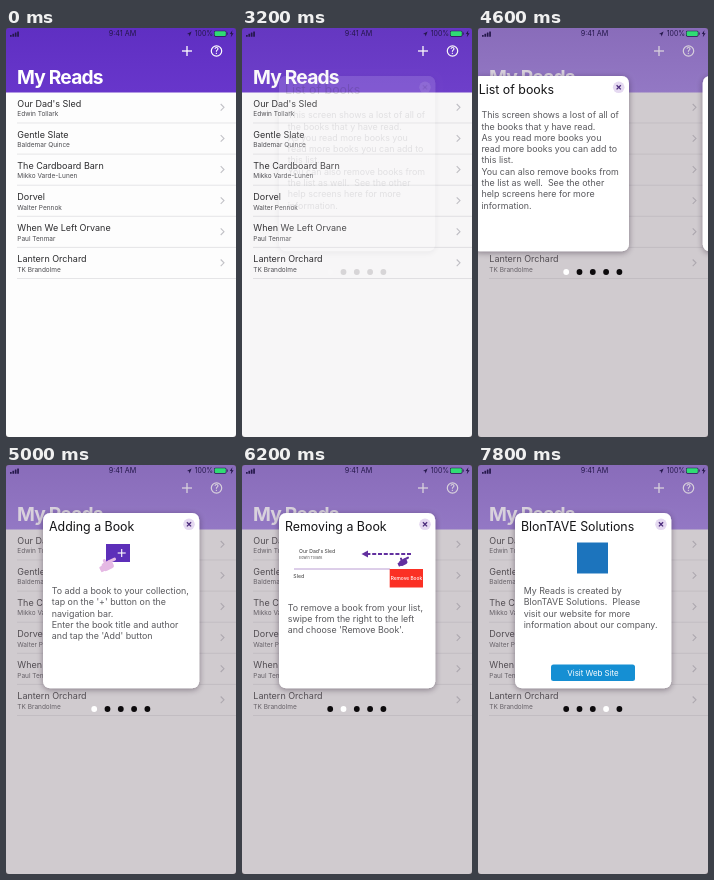
An HTML page with a canvas that plays this animation: 230x409 px, repeating every 8000 ms.

```html
<!DOCTYPE html>
<html lang="en">
<head>
<meta charset="utf-8">
<title>Book list help</title>
<style>
html, body { margin: 0; width: 100%; height: 100%; overflow: hidden; background: #fff; }
canvas { display: block; width: 230px; height: 409px; }
</style>
</head>
<body>
<canvas id="stage"></canvas>
<script>
const W = 230, H = 409, LOOP = 8000;
const FADE_START = 3085, FADE_LENGTH = 500;
const SWIPE_STARTS = [4500, 5700, 7100], SWIPE_LENGTH = 500, DOT_DELAY = 650;

const canvas = document.getElementById('stage');
const scale = window.devicePixelRatio || 1;
canvas.width = Math.round(W * scale);
canvas.height = Math.round(H * scale);
const ctx = canvas.getContext('2d');

const FONT = 'Inter, Roboto, sans-serif';
const books = [
  ["Our Dad's Sled", 'Edwin Tollark'],
  ['Gentle Slate', 'Baldemar Quince'],
  ['The Cardboard Barn', 'Mikko Varde-Lunen'],
  ['Dorvel', 'Walter Pennok'],
  ['When We Left Orvane', 'Paul Tenmar'],
  ['Lantern Orchard', 'TK Brandolme'],
];

const clamp = v => Math.max(0, Math.min(1, v));
const smooth = v => { const u = clamp(v); return u * u * (3 - 2 * u); };
// Short pick-up by the finger, then a long deceleration.
const flick = v => { const u = clamp(v); return 1 - (1 - u) ** 3 * (1 + 3 * u); };
const mix = (a, b, k) => `rgb(${a.map((v, i) => Math.round(v + (b[i] - v) * k)).join()})`;

function text(str, x, y, size, color, { weight = 400, align = 'left', spacing = 0 } = {}) {
  ctx.font = `${weight} ${size}px ${FONT}`;
  ctx.letterSpacing = spacing + 'px';
  ctx.textAlign = align;
  ctx.fillStyle = color;
  ctx.fillText(str, x, y);
}

function rect(x, y, w, h, color, r = 0) {
  ctx.fillStyle = color;
  ctx.beginPath();
  ctx.roundRect(x, y, w, h, r);
  ctx.fill();
}

function disc(x, y, r, color) {
  ctx.fillStyle = color;
  ctx.beginPath();
  ctx.arc(x, y, r, 0, Math.PI * 2);
  ctx.fill();
}

function line(points, color, width) {
  ctx.strokeStyle = color;
  ctx.lineWidth = width;
  ctx.beginPath();
  points.forEach(([x, y]) => ctx.lineTo(x, y));
  ctx.stroke();
}

function plus(x, y, r, color, width) {
  line([[x - r, y], [x + r, y]], color, width);
  line([[x, y - r], [x, y + r]], color, width);
}

function shape(points, color) {
  ctx.fillStyle = color;
  ctx.beginPath();
  points.forEach(([x, y]) => ctx.lineTo(x, y));
  ctx.fill();
}

// Pointing hand, finger tip at the upper right.
function hand(x, y, size, color) {
  ctx.save();
  ctx.translate(x, y);
  ctx.scale(size, size);
  ctx.rotate(-0.45);
  rect(-7, -3, 12, 9, color, 3);
  rect(0, -3.2, 10, 3.2, color, 1.6);
  rect(-3.5, -6.5, 3.2, 7, color, 1.6);
  rect(-10, -1, 5, 6, color, 1);
  ctx.restore();
}

function statusBar() {
  const ink = '#24174a';
  for (let i = 0; i < 4; i++) rect(4 + i * 2.4, 7 - i * 1.2, 1.7, 1.8 + i * 1.2, ink, 0.3);
  text('9:41 AM', 116.5, 8.2, 7.2, ink, { align: 'center' });
  shape([[181, 6], [185.6, 3.4], [183.6, 8.4], [183, 6.2]], ink);
  text('100%', 188.8, 8.2, 6.9, ink);
  rect(208, 2.7, 12.4, 6, ink, 1.4);
  rect(208.6, 3.3, 11.2, 4.8, '#2fdc74', 1);
  rect(220.8, 4.6, 0.8, 2.2, ink);
  shape([[226.4, 2.3], [223.8, 6.1], [225.4, 6.1], [224.8, 9.3], [227.6, 5.2], [225.9, 5.2]], ink);
}

function header(dim) {
  const fill = ctx.createLinearGradient(0, 0, 0, 64.5);
  fill.addColorStop(0, mix([95, 47, 194], [137, 108, 186], dim));
  fill.addColorStop(1, mix([104, 54, 203], [147, 120, 196], dim));
  rect(0, 0, W, 64.5, fill);
  statusBar();
  const light = mix([255, 255, 255], [216, 209, 220], dim);
  plus(181, 23, 5, light, 1.3);
  ctx.strokeStyle = light;
  ctx.lineWidth = 1.2;
  ctx.beginPath();
  ctx.arc(210.5, 23, 5.2, 0, Math.PI * 2);
  ctx.stroke();
  text('?', 210.5, 26.2, 8.6, light, { weight: 600, align: 'center' });
  text('My Reads', 11, 56, 19.2, light, { weight: 700, spacing: -0.8 });
}

function list(dim) {
  rect(0, 64, W, H - 64, '#fdfdfd');
  books.forEach(([title, author], i) => {
    const y = 64 + i * 31.1;
    text(title, 11.3, y + 14.7, 9, '#2b2b2d');
    text(author, 11.3, y + 24.2, 6.5, '#4c4c50');
    line([[214.7, y + 12], [218, y + 15.3], [214.7, y + 18.6]], '#c2c2c7', 1.1);
    line([[11, y + 31], [W, y + 31]], '#dcdcdf', 0.7);
  });
  rect(0, 64, W, H - 64, `rgba(140,127,138,${0.4 * dim})`);
}

function body(lines, y) {
  lines.forEach((str, i) => text(str, 45.7, y + i * 11.3, 8.9, '#59595d'));
}

function listPage() {
  body([
    'This screen shows a lost of all of', 'the books that y have read.',
    'As you read more books you', 'read more books you can add to', 'this list.',
    'You can also remove books from', 'the list as well.  See the other',
    'help screens here for more', 'information.',
  ], 90.2);
}

function addPage() {
  rect(100, 79, 24, 18, '#5d2fb9');
  plus(115.7, 88, 4, '#fff', 1.1);
  hand(102, 99, 0.95, '#e5b9e4');
  body([
    'To add a book to your collection,', "tap on the '+' button on the",
    'navigation bar.', 'Enter the book title and author', "and tap the 'Add' button",
  ], 128.9);
}

function removePage() {
  const purple = '#62309f';
  text(books[0][0], 57, 88, 5.1, '#333');
  text(books[0][1], 57, 93.6, 3.7, '#555');
  ctx.setLineDash([4, 1.8]);
  line([[169, 89], [125, 89]], purple, 2);
  ctx.setLineDash([]);
  shape([[119.5, 89], [126, 85.6], [126, 92.4]], purple);
  hand(161.5, 96, 0.65, purple);
  line([[52, 104], [148, 104]], '#b392cf', 0.9);
  text('Sled', 51.3, 113, 5.2, '#333');
  rect(147.7, 104, 33.3, 18.5, '#fb3024');
  text('Remove Book', 164.4, 115.2, 4.8, '#fff', { weight: 500, align: 'center' });
  body([
    'To remove a book from your list,', 'swipe from the right to the left',
    "and choose 'Remove Book'.",
  ], 145.6);
}

function companyPage() {
  rect(99, 77.5, 31, 31, '#1c74bd');
  body([
    'My Reads is created by', 'BlonTAVE Solutions.  Please',
    'visit our website for more', 'information about our company.',
  ], 129);
  rect(73, 199.5, 84, 16.5, '#158fd3', 2.5);
  text('Visit Web Site', 115, 210.7, 7.9, '#fff', { align: 'center' });
}

const pages = [
  ['List of books', listPage],
  ['Adding a Book', addPage],
  ['Removing a Book', removePage],
  ['BlonTAVE Solutions', companyPage],
];

// The shadow is kept outside the card so that it does not tint it during the fade.
function cardShadow(x, y, w, h, r) {
  ctx.save();
  ctx.beginPath();
  ctx.rect(x - 20, y - 20, w + 40, h + 40);
  ctx.roundRect(x, y, w, h, r);
  ctx.clip('evenodd');
  ctx.shadowColor = 'rgba(40,25,45,0.45)';
  ctx.shadowBlur = 6 * scale;
  ctx.shadowOffsetY = 1.5 * scale;
  rect(x, y, w, h, '#fff', r);
  ctx.restore();
}

function card([title, content], offset) {
  const box = [37, 48, 156.3, 175.3];
  ctx.save();
  ctx.translate(offset, 0);
  cardShadow(...box, 7);
  rect(...box, '#fff', 7);
  text(title, 43, 65.7, 12.4, '#151517');
  disc(183, 59.3, 5.8, '#e5d9f1');
  line([[180.9, 57.2], [185.1, 61.4]], '#4b2c7c', 1.3);
  line([[185.1, 57.2], [180.9, 61.4]], '#4b2c7c', 1.3);
  content();
  ctx.restore();
}

function popup(t, alpha) {
  const position = SWIPE_STARTS.reduce((sum, start) => sum + flick((t - start) / SWIPE_LENGTH), 0);
  const current = SWIPE_STARTS.filter(start => t >= start + DOT_DELAY).length;
  ctx.save();
  ctx.globalAlpha = alpha;
  pages.forEach((page, i) => {
    if (Math.abs(i - position) < 1) card(page, (i - position) * W);
  });
  for (let i = 0; i < 5; i++) disc(88.2 + i * 13.3, 244, 2.9, i === current ? '#fff' : '#0c0a0c');
  ctx.restore();
}

function corners() {
  ctx.fillStyle = '#4a464c';
  ctx.beginPath();
  ctx.rect(0, 0, W, H);
  ctx.roundRect(0, 0, W, H, 3);
  ctx.fill('evenodd');
}

function draw(t) {
  ctx.setTransform(scale, 0, 0, scale, 0, 0);
  const dim = smooth((t - FADE_START) / FADE_LENGTH);
  list(dim);
  header(dim);
  if (dim > 0) popup(t, dim);
  corners();
}

function frame() {
  draw(performance.now() % LOOP);
  requestAnimationFrame(frame);
}
frame();
</script>
</body>
</html>
```
